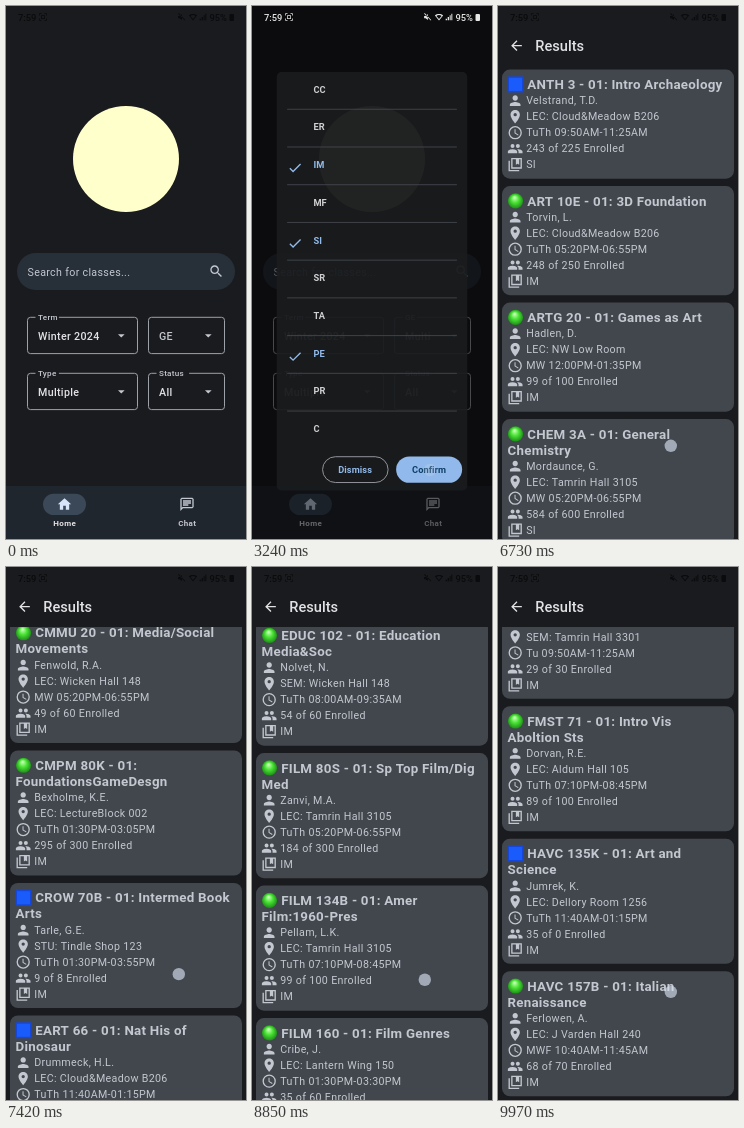
Animation, 240 px wide and 533 px high, one loop 10000 ms. Source, as an HTML page with a canvas:

```html
<!DOCTYPE html>
<html lang="en">
<head>
<meta charset="utf-8">
<title>Class search</title>
<style>
html, body { margin: 0; width: 100%; height: 100%; overflow: hidden; background: #1a1c1e; }
canvas { display: block; width: 240px; height: 533px; }
</style>
</head>
<body>
<canvas id="stage"></canvas>
<script>
const W = 240, H = 533, LOOP = 10000;
const BG = '#1a1b1e', TEXT = '#e2e2e5', SOFT = '#c3c7cf', BLUE = '#9ecaff', LINE = '#9da1a8';
const canvas = document.getElementById('stage');
const g = canvas.getContext('2d');
const dpr = window.devicePixelRatio || 1;
canvas.width = W * dpr;
canvas.height = H * dpr;

const icons = {
  search: 'M15.5 14h-.79l-.28-.27C15.41 12.59 16 11.11 16 9.5 16 5.91 13.09 3 9.5 3S3 5.91 3 9.5 5.91 16 9.5 16c1.61 0 3.09-.59 4.23-1.57l.27.28v.79l5 4.99L20.49 19zm-6 0C7.01 14 5 11.99 5 9.5S7.01 5 9.5 5 14 7.01 14 9.5 11.99 14 9.5 14z',
  home: 'M10 20v-6h4v6h5v-8h3L12 3 2 12h3v8z',
  chat: 'M4 2h16l2 2v12l-2 2H6l-4 4V4zm0 2v13.2L5.2 16H20V4zM6 12h8v2H6zm0-3h12v2H6zm0-3h12v2H6z',
  person: 'M12 12c2.21 0 4-1.79 4-4s-1.79-4-4-4-4 1.79-4 4 1.79 4 4 4zm0 2c-2.67 0-8 1.34-8 4v2h16v-2c0-2.66-5.33-4-8-4z',
  place: 'M12 2C8.13 2 5 5.13 5 9c0 5.25 7 13 7 13s7-7.75 7-13c0-3.87-3.13-7-7-7zm0 9.5a2.5 2.5 0 1 1 0-5 2.5 2.5 0 0 1 0 5z',
  clock: 'M12 2a10 10 0 1 0 0 20 10 10 0 0 0 0-20zm0 2a8 8 0 1 1 0 16 8 8 0 0 1 0-16zm.5 3H11v6l5.25 3.15.75-1.23-4.5-2.67z',
  group: 'M16 11a3 3 0 1 0 0-6 3 3 0 0 0 0 6zm-8 0a3 3 0 1 0 0-6 3 3 0 0 0 0 6zm0 2c-2.33 0-7 1.17-7 3.5V19h14v-2.5c0-2.33-4.67-3.5-7-3.5zm8 0c-.3 0-.6 0-1 .05 1.2.85 2 2 2 3.45V19h6v-2.5c0-2.33-4.67-3.5-7-3.5z',
  tag: 'M4 6H2v16h16v-2H4zM6 2v16h16V2zm2 2h12v12H8zm5 0v8l2.5-1.5L18 12V4z',
  back: 'M20 11H7.83l5.59-5.59L12 4l-8 8 8 8 1.41-1.41L7.83 13H20z',
  check: 'M9 16.17L4.83 12l-1.42 1.41L9 19 21 7l-1.41-1.41z',
  down: 'M7 10l5 5 5-5z',
  mic: 'M12 14a3 3 0 0 0 3-3V5a3 3 0 0 0-6 0v6a3 3 0 0 0 3 3zm5-3a5 5 0 0 1-10 0H5c0 3.53 2.61 6.43 6 6.92V21h2v-3.08c3.39-.49 6-3.39 6-6.92z',
  grid: 'M3 3h8v8H3zm2 2v4h4V5zm8-2h8v8h-8zm2 2v4h4V5zM3 13h8v8H3zm2 2v4h4v-4zm8-2h8v8h-8zm2 2v4h4v-4z',
  sticker: 'M5 3h14l2 2v10l-6 6H5l-2-2V5zm0 2v14h9v-5h5V5zM8 8h2v3H8zm6 0h2v3h-2zm-6 5h5v2H8z',
  clip: 'M4 3h5l1-2h4l1 2h5v18H4zm2 2v14h12V5h-2v3H8V5zm2 6h8v1.5H8zm0 4h6v1.5H8z',
  palette: 'M12 3a9 9 0 0 0 0 18c2 0 2-1.5 1.3-2.5-.6-1 0-2.5 1.7-2.5h2a4 4 0 0 0 4-4c0-5-4-9-9-9zM6.5 10.5a1.5 1.5 0 1 1 0 3 1.5 1.5 0 0 1 0-3zm3-4a1.5 1.5 0 1 1 0 3 1.5 1.5 0 0 1 0-3zm5 0a1.5 1.5 0 1 1 0 3 1.5 1.5 0 0 1 0-3zm3 4a1.5 1.5 0 1 1 0 3 1.5 1.5 0 0 1 0-3z',
  shift: 'M12 2L2 12h5v8h10v-8h5zm0 3l5 5h-2v8H9v-8H7z',
  erase: 'M7 4h16v16H7l-6-8zm1 2l-4.5 6L8 18h13V6zm3 2.5l3 3 3-3 1.2 1.2-3 3 3 3-1.2 1.2-3-3-3 3-1.2-1.2 3-3-3-3z',
  smile: 'M12 2a10 10 0 1 0 0 20 10 10 0 0 0 0-20zm0 2a8 8 0 1 1 0 16 8 8 0 0 1 0-16zM7.5 8h2v3h-2zm7 0h2v3h-2zM7 13.5h10c-1 5-9 5-10 0z',
  wifi: 'M12 21L1 8c6-5 16-5 22 0zM5 9l7 8 7-8c-4-3-10-3-14 0z',
  signal: 'M2 22h4v-5H2zm6 0h4V12H8zm6 0h3V7h-3zm5 0h3V2h-3z',
  mute: 'M3 9h4l6-5v16l-6-5H3zM3 3l1.5-1.5L22 20l-1.5 1.5z',
  shot: 'M2 2h6v2H4v4H2zm14 0h6v6h-2V4h-4zM2 16h2v4h4v2H2zm18 0h2v6h-6v-2h4zM7 7h10v10H7zm2 2v6h6V9z'
};
for (const k in icons) icons[k] = new Path2D(icons[k]);

const ease = (t, a, b) => {
  const x = Math.min(1, Math.max(0, (t - a) / (b - a)));
  return x * x * (3 - 2 * x);
};
function text(s, x, y, size, color, { weight = 400, gap = 0, align = 'left' } = {}) {
  g.font = `${weight} ${size}px Roboto, sans-serif`;
  g.letterSpacing = gap + 'px';
  g.textAlign = align;
  g.fillStyle = color;
  g.fillText(s, x, y);
}
const body = (s, x, y, color, weight) => text(s, x, y, 10.67, color, { gap: .33, weight });
function icon(name, x, y, color, size = 16) {
  g.save();
  g.translate(x - size / 2, y - size / 2);
  g.scale(size / 24, size / 24);
  g.fillStyle = color;
  g.fill(icons[name], 'evenodd');
  g.restore();
}
function rect(x, y, w, h, color) { g.fillStyle = color; g.fillRect(x, y, w, h); }
function round(x, y, w, h, r, fill, stroke) {
  g.beginPath();
  g.roundRect(x, y, w, h, r);
  if (fill) { g.fillStyle = fill; g.fill(); }
  if (stroke) { g.strokeStyle = stroke; g.lineWidth = 1; g.stroke(); }
}
function disc(x, y, r, color) {
  g.beginPath();
  g.arc(x, y, r, 0, 7);
  g.fillStyle = color;
  g.fill();
}
function faded(alpha, draw) {
  if (alpha <= 0) return;
  g.save();
  g.globalAlpha *= alpha;
  draw();
  g.restore();
}

function statusBar(color) {
  const opt = { weight: 500 };
  text('7:59', 12, 14.5, 9.3, color, opt);
  icon('shot', 37, 11, color, 9);
  icon('mute', 175.5, 11, color, 9);
  icon('wifi', 187, 11, color, 9);
  icon('signal', 197, 11, color, 8);
  text('95%', 203.5, 14.5, 9.3, color, opt);
  round(223.5, 8, 4.5, 7, 1, color);
}

function field(x, y, w, label, value) {
  round(x, y, w, 36.3, 3, null, LINE);
  icon('down', x + w - 16.2, y + 18.3, SOFT);
  if (!value) return body(label, x + 10.5, y + 22.2, SOFT, 500);
  rect(x + 8, y - 2, label.length * 4.6 + 5, 4, BG);
  text(label, x + 10.5, y + 2.8, 8.1, SOFT, { weight: 500, gap: .27 });
  body(value, x + 10.5, y + 22.2, TEXT, 500);
}

function home(t) {
  rect(0, 0, W, H, BG);
  statusBar('#0a0b0c');
  disc(120, 153, 53, '#ffffcc');
  round(11, 247, 218, 37, 18.5, '#272f38');
  body('Search for classes...', 21.5, 269.7, SOFT);
  icon('search', 210.3, 265.3, SOFT);
  if (t > 4280) rect(21, 257.5, 1.3, 16, BLUE);
  field(21.5, 311.3, 110, 'Term', 'Winter 2024');
  field(142.5, 311.3, 76, 'GE', t > 3200 ? 'Multi' : '');
  field(21.5, 367.3, 110, 'Type', 'Multiple');
  field(142.5, 367.3, 76, 'Status', 'All');
  rect(0, 480, W, 53, '#20262e');
  round(37, 487.7, 43, 21.3, 10.7, '#3b4858');
  icon('home', 58.5, 498.3, '#d7e3f8');
  icon('chat', 181, 498.3, SOFT);
  text('Home', 58.7, 520, 8, TEXT, { weight: 700, gap: .33, align: 'center' });
  text('Chat', 181.2, 520, 8, SOFT, { weight: 600, gap: .33, align: 'center' });
}

// Taps: press time, release time, x, y and, inside the dialog, the row
const taps = [
  [210, 330, 190, 330], [1190, 1440, 128, 355, 7], [1750, 1860, 130, 239, 4],
  [2350, 2460, 130, 163, 2], [3090, 3180, 178, 464], [4210, 4300, 112, 266], [4850, 4950, 220, 512]
];
const options = 'CC ER IM MF SI SR TA PE PR C'.split(' ');

function dialog(t) {
  round(24, 64.5, 192, 421.5, 5, '#1a1c1e');
  options.forEach((name, i) => {
    const y = 64 + 38 * i;
    const tap = taps.find(p => p[4] === i);
    const on = tap && t >= tap[1];
    if (tap && t >= tap[0]) faded(1 - ease(t, tap[1] + 60, tap[1] + 300), () => {
      g.beginPath();
      g.rect(24, y + 2, 192, 38);
      g.clip();
      disc(tap[2], y + 19, 20 + 130 * ease(t, tap[0], tap[0] + 225), 'rgba(255,255,255,.12)');
    });
    if (on) icon('check', 42.5, y + 21, BLUE);
    text(name, 61, y + 21.3, 9.33, on ? BLUE : TEXT, { weight: 600, gap: .07 });
    if (i < 9) rect(34.5, y + 37.5, 171, 1, '#42474e');
  });
  const label = { weight: 600, gap: .07, align: 'center' };
  round(70.2, 452, 66, 26, 13, null, LINE);
  text('Dismiss', 103, 468.5, 9.33, BLUE, label);
  round(144.3, 451.7, 66.5, 26.6, 13.3, BLUE);
  text('Confirm', 177.5, 468.5, 9.33, '#003258', label);
}

function keyboard() {
  const key = '#f4f4f6', tool = '#bdbdc1';
  rect(0, 364, W, 169, '#000');
  disc(15, 378.5, 11.5, '#454549');
  disc(224.5, 378.5, 11.5, '#59595d');
  ['grid', 'sticker', 'clip', '', '', 'palette', 'mic'].forEach((n, i) => {
    if (n) icon(n, 15 + 34.9 * i, 378.5, tool, 15);
  });
  const mid = { weight: 500, align: 'center' };
  text('GIF', 119.7, 382, 9.3, tool, { weight: 700, align: 'center' });
  g.strokeStyle = tool;
  g.lineWidth = 2.5;
  g.beginPath();
  g.arc(154.6, 378.5, 3.2, 0, 7);
  g.stroke();
  for (let i = 0; i < 8; i++) {
    const a = i * Math.PI / 4;
    disc(154.6 + 4.6 * Math.cos(a), 378.5 + 4.6 * Math.sin(a), 1.2, tool);
  }
  ['qwertyuiop', 'asdfghjkl', 'zxcvbnm'].forEach((row, r) => {
    [...row].forEach((c, i) => {
      const x = [12.4, 24.7, 48.5][r] + 23.8 * i;
      text(c, x, 417 + 33.6 * r, 16, key, mid);
      if (!r) text((i + 1) % 10, x + 8.5, 406.5, 6.8, key, mid);
    });
  });
  icon('shift', 19, 480, key, 18);
  icon('erase', 220.5, 480, key, 18);
  round(3, 499.5, 33, 25, 12.5, '#69696d');
  text('?123', 19.5, 515.3, 9, key, mid);
  text(',', 48.5, 516, 15, key, mid);
  icon('smile', 72, 512, key);
  round(85, 499.5, 93, 25, 12.5, '#747478');
  text('.', 191, 516, 15, key, mid);
  round(204, 499.5, 33, 25, 12.5, '#5f9df8');
  icon('search', 220.5, 512, '#fff', 17);
}

// b/g marker | title lines | teacher | room | time | enrolled | GE
const cards = `b|ANTH 3 - 01: Intro Archaeology||Velstrand, T.D.|LEC: Cloud&Meadow B206|TuTh 09:50AM-11:25AM|243 of 225|SI
g|ART 10E - 01: 3D Foundation||Torvin, L.|LEC: Cloud&Meadow B206|TuTh 05:20PM-06:55PM|248 of 250|IM
g|ARTG 20 - 01: Games as Art||Hadlen, D.|LEC: NW Low Room|MW 12:00PM-01:35PM|99 of 100|IM
g|CHEM 3A - 01: General|Chemistry|Mordaunce, G.|LEC: Tamrin Hall 3105|MW 05:20PM-06:55PM|584 of 600|SI
g|CMMU 20 - 01: Media/Social|Movements|Fenwold, R.A.|LEC: Wicken Hall 148|MW 05:20PM-06:55PM|49 of 60|IM
g|CMPM 80K - 01:|FoundationsGameDesgn|Bexholme, K.E.|LEC: LectureBlock 002|TuTh 01:30PM-03:05PM|295 of 300|IM
b|CROW 70B - 01: Intermed Book|Arts|Tarle, G.E.|STU: Tindle Shop 123|TuTh 01:30PM-03:55PM|9 of 8|IM
b|EART 66 - 01: Nat His of|Dinosaur|Drummeck, H.L.|LEC: Cloud&Meadow B206|TuTh 11:40AM-01:15PM|120 of 120|SI
g|EART 81 - 01: Ocean Basics||Sollen, P.|LEC: Tamrin Hall 3105|MW 05:20PM-06:55PM|88 of 150|SI
g|ECON 30 - 01: Market Views||Orvane, C.|LEC: Wicken Hall 148|TuTh 09:50AM-11:25AM|52 of 60|SI
g|EDUC 10 - 01: Intro Learning||Ketrin, B.|LEC: LectureBlock 002|MW 12:00PM-01:35PM|95 of 100|IM
g|EDUC 102 - 01: Education|Media&Soc|Nolvet, N.|SEM: Wicken Hall 148|TuTh 08:00AM-09:35AM|54 of 60|IM
g|FILM 80S - 01: Sp Top Film/Dig|Med|Zanvi, M.A.|LEC: Tamrin Hall 3105|TuTh 05:20PM-06:55PM|184 of 300|IM
g|FILM 134B - 01: Amer|Film:1960-Pres|Pellam, L.K.|LEC: Tamrin Hall 3105|TuTh 07:10PM-08:45PM|99 of 100|IM
g|FILM 160 - 01: Film Genres||Cribe, J.|LEC: Lantern Wing 150|TuTh 01:30PM-03:30PM|35 of 60|IM
g|FILM 165 - 01: Film Topics||Ambrey, S.|LEC: Lantern Wing 150|MW 12:00PM-01:35PM|41 of 60|IM
g|FMST 40 - 01: Media and|Culture|Ravell, M.|SEM: Tamrin Hall 3301|Tu 09:50AM-11:25AM|29 of 30|IM
g|FMST 71 - 01: Intro Vis|Aboltion Sts|Dorvan, R.E.|LEC: Aldum Hall 105|TuTh 07:10PM-08:45PM|89 of 100|IM
b|HAVC 135K - 01: Art and|Science|Jumrek, K.|LEC: Dellory Room 1256|TuTh 11:40AM-01:15PM|35 of 0|IM
g|HAVC 157B - 01: Italian|Renaissance|Ferlowen, A.|LEC: J Varden Hall 240|MWF 10:40AM-11:45AM|68 of 70|IM`
  .split('\n').map(s => s.split('|'));

function marker(kind, x, y) {
  if (kind === 'b') {
    rect(x - 8, y - 8, 16, 16, '#1747d8');
    rect(x - 6.5, y - 6.5, 13, 13, '#1a5cfb');
    return;
  }
  const shade = g.createRadialGradient(x - 1, y - 3.5, .5, x, y, 8);
  shade.addColorStop(0, '#c4ffb4');
  shade.addColorStop(.45, '#4be336');
  shade.addColorStop(1, '#1b8a16');
  disc(x, y, 7.6, shade);
}

function card([kind, line1, line2, ...rows], y) {
  const extra = line2 ? 16 : 0;
  round(4, y, 232, 109.1 + extra, 8, '#42474e');
  marker(kind, 17.5, y + 14.8);
  const bold = { weight: 700, gap: .25 };
  text(line1, 29.2, y + 19.5, 13.33, SOFT, bold);
  text(line2, 9.5, y + 35.5, 13.33, SOFT, bold);
  rows.forEach((s, i) => {
    const cy = y + 31.1 + extra + 16 * i;
    icon(['person', 'place', 'clock', 'group', 'tag'][i], 17.2, cy, SOFT);
    body(i === 3 ? s + ' Enrolled' : s, 28.2, cy + 3.8, SOFT);
  });
}

// Swipes: finger-down time and list offset at that moment
const swipes = [[6660, 0], [7303, 462], [8020, 902], [8738, 1344.5], [9871, 2034], [10800, 2480]];
const HOLD = 60, DRAG = 130, REACH = 170;

function scrollAt(t) {
  const i = swipes.findLastIndex(s => t >= s[0]);
  if (i < 0) return { offset: 0 };
  const [start, base] = swipes[i];
  const u = Math.max(0, (t - start - HOLD) / DRAG);
  if (u <= 1) return { offset: base + REACH * u * u, finger: 441 - REACH * u * u };
  const rest = swipes[i + 1][1] - base - REACH;
  const span = 4 * rest * DRAG / (2 * REACH);
  const left = Math.max(0, 1 - (u - 1) * DRAG / span);
  return { offset: base + REACH + rest * (1 - left ** 4) };
}

function touch(x, y) { disc(x, y, 6.2, 'rgba(212,223,238,.65)'); }

function results(t) {
  rect(0, 0, W, H, BG);
  statusBar('#0a0b0c');
  icon('back', 18.5, 39.7, TEXT);
  text('Results', 37.3, 45, 14.6, TEXT, { weight: 500 });
  const { offset, finger } = scrollAt(t);
  g.save();
  g.beginPath();
  g.rect(0, 60, W, H - 60);
  g.clip();
  let y = 64.8 - offset;
  for (const c of cards) {
    if (y > -130 && y < H) card(c, y);
    y += c[2] ? 132.5 : 116.5;
  }
  g.restore();
  if (finger) touch(172.8, finger);
}

function frame(now) {
  const t = now % LOOP;
  g.setTransform(dpr, 0, 0, dpr, 0, 0);
  const page = ease(t, 4960, 5670);
  if (page < 1) home(t);
  faded(page, () => results(t));

  const shown = ease(t, 420, 700) - ease(t, 3200, 3420);
  faded(shown, () => {
    rect(0, 0, W, H, 'rgba(0,0,0,.6)');
    statusBar('#fff');
    const k = .92 + .08 * shown;
    g.translate(120, 275);
    g.scale(k, k);
    g.translate(-120, -275);
    dialog(t);
  });

  const up = ease(t, 4300, 4560) - ease(t, 4980, 5230);
  if (up > 0) {
    g.save();
    g.translate(0, 169 * (1 - up));
    keyboard();
    g.restore();
  }
  for (const [down, release, x, y] of taps) {
    if (t >= down) faded(1 - ease(t, release, release + 100), () => touch(x, y));
  }
  requestAnimationFrame(frame);
}
requestAnimationFrame(frame);
</script>
</body>
</html>
```
